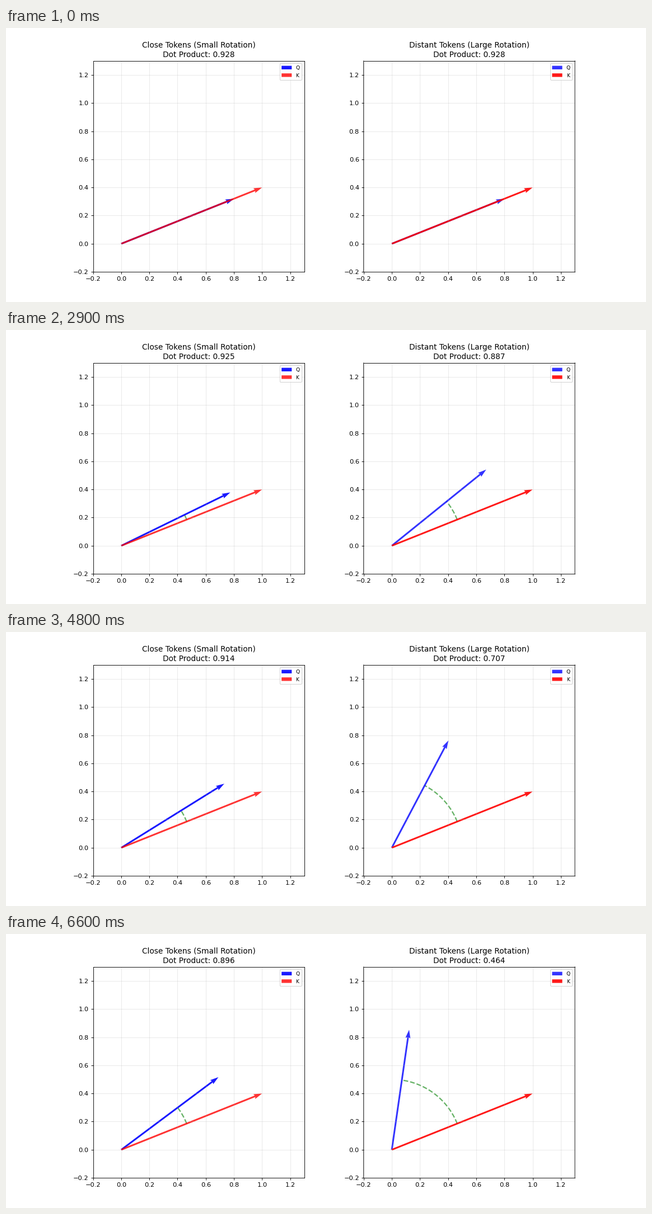
Recreate the animation shown at these times as a matplotlib script. Size 1143 by 490 pixels, loop 8000 ms.

```python
import numpy as np
import matplotlib.pyplot as plt
from matplotlib.animation import FuncAnimation

WIDTH, HEIGHT, DPI = 1143, 490, 490 / 6
FRAMES, INTERVAL = 80, 100
PAUSE, TURN = 15, 49
ARC_RADIUS = 0.5

q0 = np.array([0.8, 0.32])
k = np.array([1.0, 0.4])
k_angle = np.arctan2(k[1], k[0])

# The tiny margin keeps the pixel size from being rounded down.
fig, axes = plt.subplots(
    1, 2, figsize=((WIDTH + 1e-6) / DPI, (HEIGHT + 1e-6) / DPI), dpi=DPI)


def rotate(v, angle):
    c, s = np.cos(angle), np.sin(angle)
    return np.array([c * v[0] - s * v[1], s * v[0] + c * v[1]])


def arrow(ax, v, color, alpha, label):
    return ax.quiver(0, 0, v[0], v[1], angles="xy", scale_units="xy", scale=1,
                     color=color, alpha=alpha, width=0.008, label=label)


class Panel:
    def __init__(self, ax, title, max_degrees, q_alpha, k_alpha):
        self.title = title
        self.max_angle = np.radians(max_degrees)
        ax.set_xlim(-0.2, 1.3)
        ax.set_ylim(-0.2, 1.3)
        ax.set_aspect("equal")
        ax.grid(True, alpha=0.3)
        # The arc lies under the arrows.
        self.arc, = ax.plot([], [], "--", color="green", lw=2, alpha=0.6,
                            zorder=0.9)
        self.q = arrow(ax, q0, "blue", q_alpha, "Q")
        arrow(ax, k, "red", k_alpha, "K")
        self.heading = ax.set_title(title, fontsize=12, linespacing=1.3)
        legend = ax.legend(loc="upper right", fontsize=8)
        for handle in legend.legend_handles:
            handle.set_snap(False)

    def update(self, progress):
        angle = progress * self.max_angle
        q = rotate(q0, angle)
        self.q.set_UVC(q[0], q[1])
        self.heading.set_text(f"{self.title}\nDot Product: {q @ k:.3f}")
        theta = np.linspace(k_angle, k_angle + angle, 50)
        self.arc.set_data(ARC_RADIUS * np.cos(theta),
                          ARC_RADIUS * np.sin(theta))


panels = [
    Panel(axes[0], "Close Tokens (Small Rotation)", 15, 0.9, 0.8),
    Panel(axes[1], "Distant Tokens (Large Rotation)", 60, 0.8, 0.9),
]

# The right panel's sides fall between two pixel columns.
axes[1].spines[["left", "right"]].set_snap(False)


def update(frame):
    progress = min(max((frame - PAUSE) / TURN, 0), 1)
    for panel in panels:
        panel.update(progress)
    return []


anim = FuncAnimation(fig, update, frames=FRAMES, interval=INTERVAL,
                     repeat=True, repeat_delay=0, blit=False)
plt.show()
```
